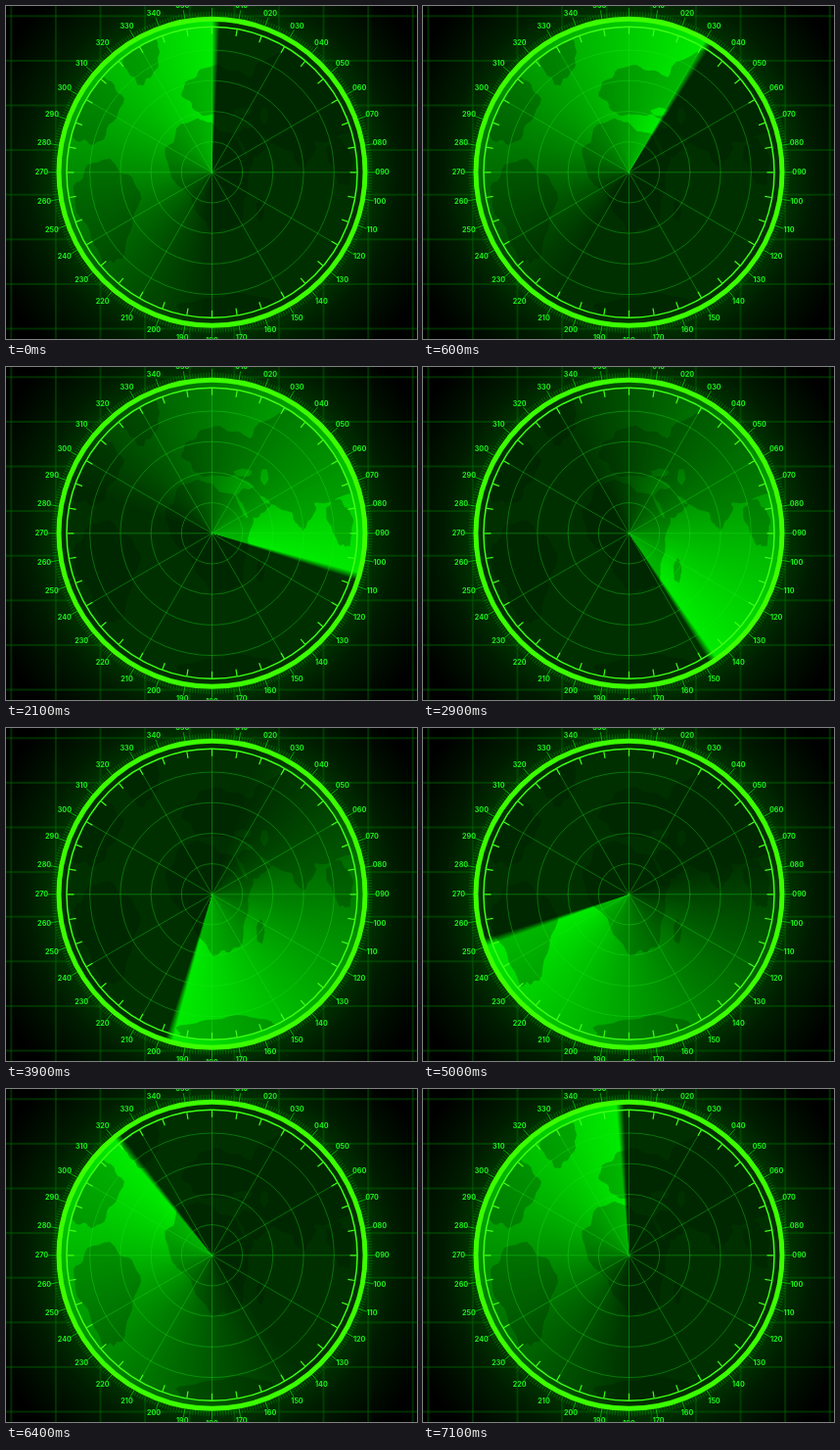
An HTML page with a canvas for the animation above (7.2 s loop, 420 by 340 pixels).

```html
<!DOCTYPE html>
<html lang="en">
<head>
<meta charset="utf-8">
<title>Radar sweep</title>
<style>
html, body { margin: 0; height: 100%; overflow: hidden; background: #000; }
canvas { display: block; }
</style>
</head>
<body>
<canvas id="radar" width="420" height="340"></canvas>
<script>
const ctx = document.getElementById('radar').getContext('2d');
const W = 420, H = 340, CX = 210.5, CY = 169.8, LOOP = 7200, STEP = 100;
const TAU = 2 * Math.PI;
const rad = deg => deg * TAU / 360;

// A rough-edged oval that narrows (taper) and drifts east (lean) toward the south.
function fillCoast(g, x, y, w, h, taper = 0, lean = 0) {
  g.beginPath();
  for (let a = 0; a < TAU; a += TAU / 48) {
    const rough = 1 + .07 * Math.sin(5 * a + x) + .05 * Math.sin(11 * a + y);
    const south = Math.sin(a);
    g.lineTo(x + w * rough * Math.cos(a) * (1 - taper * south) + lean * south,
      y + h * rough * south);
  }
  g.fill();
}

function makeMap() {
  const map = document.createElement('canvas');
  map.width = W;
  map.height = H;
  const g = map.getContext('2d');
  g.fillStyle = '#001400';
  fillCoast(g, 84, 105, 32, 36, .3);           // North America
  fillCoast(g, 104, 212, 29, 52, .5, 4);       // South America
  fillCoast(g, 138, 56, 18, 24, .4);           // Greenland
  fillCoast(g, 211, 175, 39, 57, .4, 12);      // Africa
  fillCoast(g, 260, 208, 4, 12);               // Madagascar
  fillCoast(g, 218, 88, 36, 26);               // Europe
  fillCoast(g, 300, 96, 66, 48);               // Asia
  fillCoast(g, 252, 138, 17, 15);              // Arabia
  fillCoast(g, 303, 148, 12, 18, .6);          // India
  fillCoast(g, 342, 160, 12, 24, .3, 5);       // Southeast Asia
  fillCoast(g, 235, 314, 60, 19);              // Antarctica
  g.globalCompositeOperation = 'destination-out';
  fillCoast(g, 217, 115, 21, 4, 0, 3);         // Mediterranean
  fillCoast(g, 242, 108, 9, 4);                // Black Sea
  fillCoast(g, 264, 112, 4, 8);                // Caspian Sea
  fillCoast(g, 241, 143, 2, 12, 0, 6);         // Red Sea
  fillCoast(g, 265, 136, 3, 4, 0, 4);          // Persian Gulf
  return map;
}
const map = makeMap();

function circle(r) {
  ctx.beginPath();
  ctx.arc(CX, CY, r, 0, TAU);
}

function ring(r, color, width) {
  circle(r);
  ctx.strokeStyle = color;
  ctx.lineWidth = width;
  ctx.stroke();
}

function rays(step, from, to, color, width) {
  ctx.beginPath();
  for (let deg = 0; deg < 360; deg += step) {
    const x = Math.sin(rad(deg)), y = -Math.cos(rad(deg));
    ctx.moveTo(CX + x * from, CY + y * from);
    ctx.lineTo(CX + x * to, CY + y * to);
  }
  ctx.strokeStyle = color;
  ctx.lineWidth = width;
  ctx.stroke();
}

function drawBackground() {
  const glow = ctx.createRadialGradient(CX, CY, 150, CX, CY, 245);
  glow.addColorStop(0, '#003c00');
  glow.addColorStop(.4, '#001c00');
  glow.addColorStop(1, '#000');
  ctx.fillStyle = glow;
  ctx.fillRect(0, 0, W, H);
  ctx.fillStyle = 'rgba(0,110,0,.4)';
  for (let i = 0; i < 10; i++) {
    ctx.fillRect(4.3 + i * 45.6, 0, 2, H);
    ctx.fillRect(0, 9.3 + i * 45.6, W, 2);
  }
}

function drawSweep(heading) {
  const softEdge = 3;
  const beam = ctx.createConicGradient(rad(heading - 90 + softEdge), CX, CY);
  beam.addColorStop(0, 'rgba(0,255,0,0)');
  beam.addColorStop(.5, 'rgba(0,255,0,0)');
  beam.addColorStop(1 - softEdge / 360, 'rgba(0,255,0,.9)');
  beam.addColorStop(1, 'rgba(0,255,0,0)');
  ctx.save();
  circle(155);
  ctx.clip();
  ctx.fillStyle = '#003000';
  ctx.fillRect(0, 0, W, H);
  ctx.fillStyle = beam;
  ctx.fillRect(0, 0, W, H);
  circle(148);
  ctx.clip();
  ctx.globalAlpha = .24;
  ctx.drawImage(map, 0, 0);
  ctx.restore();
}

function drawDial() {
  const line = 'rgba(30,230,30,.36)', bright = '#3cff14';
  for (let i = 1; i <= 4; i++) ring(i * 31.2, line, 1);
  rays(30, 0, 148, line, 1);
  rays(10, 141, 148, bright, 1.2);
  rays(1, 159, 164, 'rgba(0,255,0,.35)', .7);
  rays(10, 159, 168, 'rgba(0,255,0,.55)', 1);
  ring(148.5, bright, 1.5);
  ring(156.5, '#3cff00', 5);

  ctx.fillStyle = '#1cf01c';
  ctx.font = 'bold 7.2px Inter, sans-serif';
  ctx.textAlign = 'center';
  for (let deg = 0; deg < 360; deg += 10) {
    ctx.fillText(String(deg).padStart(3, '0'),
      CX + 174 * Math.sin(rad(deg)), CY + 2 - 172 * Math.cos(rad(deg)));
  }
}

function frame() {
  const tick = Math.floor(performance.now() % LOOP / STEP);
  drawBackground();
  drawSweep(tick * 360 * STEP / LOOP);
  drawDial();
  requestAnimationFrame(frame);
}
frame();
</script>
</body>
</html>
```
